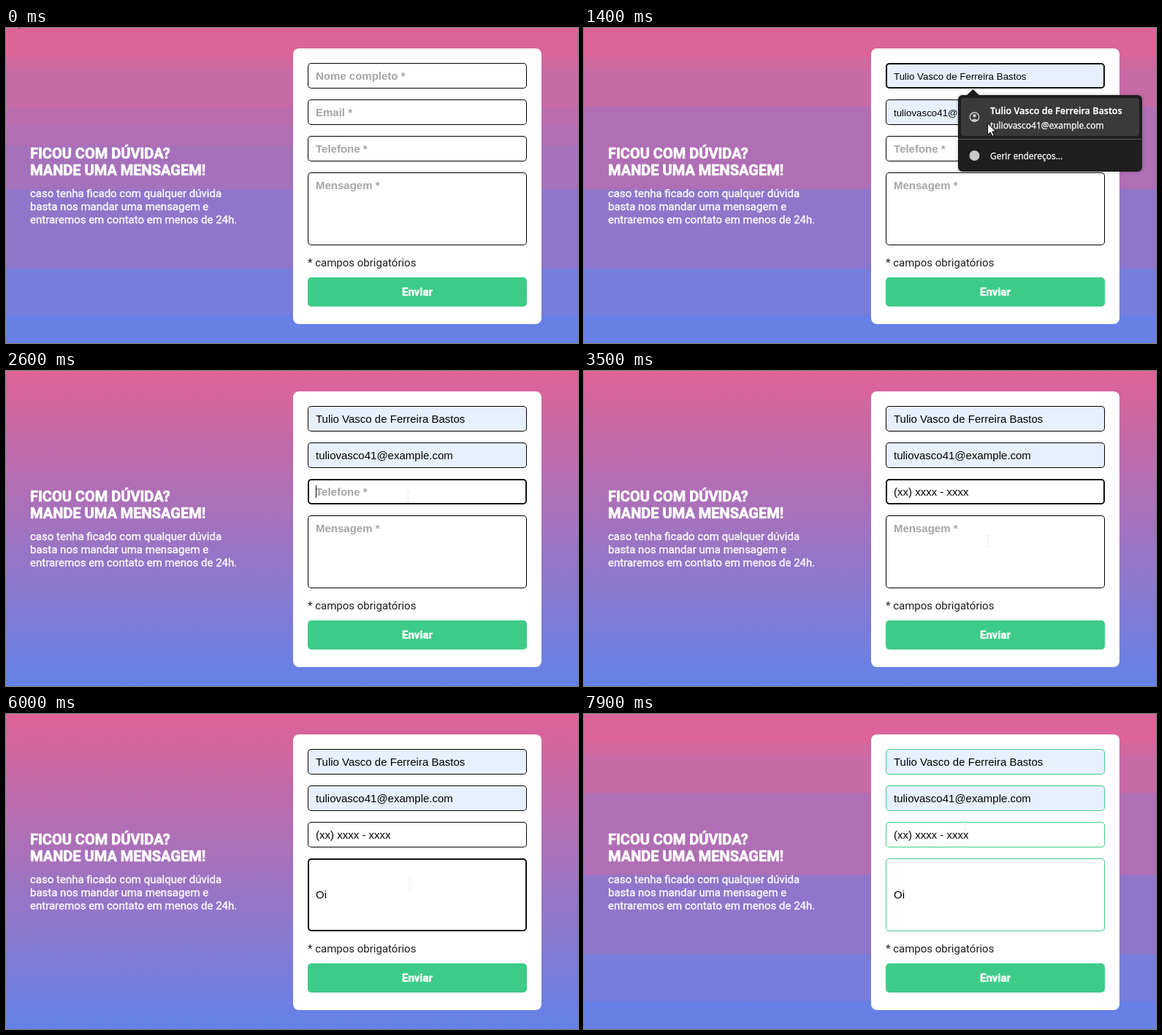
Animation, 783 px wide and 432 px high, one loop 8 s. Source, as an HTML page with a canvas:

```html
<!DOCTYPE html>
<html lang="pt">
<head>
<meta charset="utf-8">
<style>
  html, body { margin: 0; width: 783px; height: 432px; overflow: hidden; }
  canvas { display: block; }
</style>
</head>
<body>
<canvas id="stage" width="783" height="432"></canvas>
<script>
const ctx = document.getElementById('stage').getContext('2d');
const LOOP = 8000, STEP = 100;
const NAME = 'Tulio Vasco de Ferreira Bastos';
const EMAIL = 'tuliovasco41@example.com';
const PHONE = '(xx) xxxx - xxxx';
const GREEN = '#3dcc87';
const ARIAL = 'px "Liberation Sans", Arial, sans-serif';
const ROBOTO = 'px Roboto, sans-serif';
const MENU = 'px "Open Sans", sans-serif';

// Background bands: [top, colour]
const ends = [[222, '#8f76ca'], [331, '#767ddb'], [395, '#6780e5']];
const start = [[0, '#dc6499'], [41, '#d1689f'], [57, '#c86aa6']];
const introBands = [...start, [109, '#bb6cad'], [135, '#b16eb3'], [162, '#a671bb'], ...ends];
const bands = [...start, [109, '#b06eb4'], ...ends];

// Pointer track: [time, x, y]
const track = [
  [0, 11, -18], [500, 493, 308], [600, 493, 308], [900, 534, 68], [1200, 534, 68],
  [1400, 552, 130], [1700, 552, 130], [2000, 550, 176], [2200, 550, 176], [2300, 550, 172],
  [3000, 550, 172], [3100, 544, 192], [3300, 552, 233], [6500, 552, 233], [7000, 592, 366],
  [7300, 592, 366], [7600, 585, 362], [7700, 585, 362], [7900, 521, 150]
];

const arrow = new Path2D('M.5 .5V16.5L4.3 13L6.8 18.5L9.3 17.4L6.9 12H11.5Z');
const hand = new Path2D('M-1.5 2Q0 -.8 1.5 2V9Q3.2 7.3 4.5 9.5Q6.2 8 7.4 10Q9.6 9 10.5 11.5V16Q10.3 20 8 23.3H1Q-1 18.5 -4.8 14.8Q-5.6 11.6 -1.5 14Z');
const person = new Path2D('M-4 4.6Q0 .2 4 4.6Q0 7.4 -4 4.6Z');

const between = (t, a, b) => t >= a && t < b;

function box(x, y, w, h, r, fill) {
  ctx.fillStyle = fill;
  ctx.beginPath();
  ctx.roundRect(x, y, w, h, r);
  ctx.fill();
}

function disc(x, y, r, fill) {
  box(x - r, y - r, 2 * r, 2 * r, r, fill);
}

function text(str, x, y, font, fill) {
  ctx.font = font;
  ctx.fillStyle = fill;
  ctx.fillText(str, x, y);
  return ctx.measureText(str).width;
}

// Light text on a dark ground, thickened by a hairline
function lightText(str, x, y, font, weight = 0.3) {
  text(str, x, y, font, '#fff');
  ctx.strokeStyle = '#fff';
  ctx.lineWidth = weight;
  ctx.lineJoin = 'round';
  ctx.strokeText(str, x, y);
}

function background(t) {
  const grad = ctx.createLinearGradient(0, 0, 0, 432);
  if (between(t, 2500, 6600)) {
    grad.addColorStop(0, '#df6396');
    grad.addColorStop(1, '#6382e8');
  } else {
    const list = t < 700 ? introBands : bands;
    list.forEach(([top, colour], i) => {
      const bottom = i + 1 < list.length ? list[i + 1][0] : 432;
      grad.addColorStop(top / 432, colour);
      grad.addColorStop((bottom - 2) / 432, colour);
    });
  }
  ctx.fillStyle = grad;
  ctx.fillRect(0, 0, 783, 432);
}

function field(y, h, { hint, value = '', size = 15, focus, caret, filled, line = y + 23 }, valid) {
  const edge = focus ? 2 : 1;
  box(413, y, 300, h, 5, focus ? '#101010' : valid ? GREEN : '#000');
  box(413 + edge, y + edge, 300 - 2 * edge, h - 2 * edge, 5 - edge, filled ? '#e8f0fe' : '#fff');
  let width = 0;
  if (value) width = text(value, 424, line, size + ARIAL, '#000');
  else text(hint, 424, y + 23, 'bold 15' + ARIAL, '#a5a5a5');
  if (caret) {
    ctx.fillStyle = '#000';
    ctx.fillRect(Math.floor(424 + width), line - 14, 1, 17);
  }
}

function menu(hover) {
  ctx.save();
  ctx.shadowColor = '#0004';
  ctx.shadowBlur = 4;
  box(512, 92, 252, 105, 6, '#1e1e1e');
  ctx.restore();
  ctx.fillStyle = '#1e1e1e';
  ctx.fill(new Path2D('M523 93L532.5 84L542 93Z'));
  if (hover) box(516, 96, 244, 52, 4, '#3a3a3a');
  ctx.fillStyle = '#555';
  ctx.fillRect(512, 152, 252, 1);

  ctx.save();
  ctx.translate(534.5, 122);
  ctx.strokeStyle = '#c8c8c8';
  ctx.lineWidth = 1.5;
  ctx.beginPath();
  ctx.arc(0, 0, 6.2, 0, 7);
  ctx.stroke();
  disc(0, -1.8, 2.3, '#c8c8c8');
  ctx.fill(person);
  ctx.restore();
  disc(534.5, 175, 7, '#c8c8c8');

  lightText(NAME, 556, 118, '600 12.6' + MENU);
  lightText(EMAIL, 556, 138, '12' + MENU);
  lightText('Gerir endereços...', 556, 180, '12' + MENU);
}

function pointerAt(t) {
  let i = track.findIndex(key => key[0] > t);
  if (i < 0) i = track.length - 1;
  const [t0, x0, y0] = track[i - 1], [t1, x1, y1] = track[i];
  const k = Math.min(1, (t - t0) / (t1 - t0));
  const ease = k * k * (3 - 2 * k);
  return [Math.round(x0 + (x1 - x0) * ease), Math.round(y0 + (y1 - y0) * ease)];
}

function pointer(t) {
  const [x, y] = pointerAt(t);
  const inColumn = between(x, 413, 713);
  const fromMenu = between(t, 1300, 1800);
  const overField = inColumn && !fromMenu &&
    [[48, 83], [98, 133], [148, 183], [198, 298]].some(([a, b]) => between(y, a, b));

  ctx.save();
  ctx.translate(x, y);
  if (overField) {
    ctx.fillStyle = '#f0f0f0';
    ctx.fillRect(-3, -8, 7, 1);
    ctx.fillRect(0, -8, 1, 17);
    ctx.fillRect(-3, 8, 7, 1);
  } else {
    const shape = inColumn && between(y, 342, 382) ? hand : arrow;
    ctx.fillStyle = '#fff';
    ctx.strokeStyle = '#000';
    ctx.lineWidth = 1;
    ctx.fill(shape);
    ctx.stroke(shape);
    if (shape === hand) {
      ctx.fillStyle = '#000';
      for (const fx of [1, 4, 7]) ctx.fillRect(fx, 9, 1, 4);
    }
  }
  ctx.restore();
}

function draw(t) {
  const filled = t >= 1300;
  const valid = t >= 7200;
  const size = t < 1600 ? 40 / 3 : 15;

  background(t);
  lightText('FICOU COM DÚVIDA?', 33, 179, 'bold 20' + ROBOTO, 0.7);
  lightText('MANDE UMA MENSAGEM!', 33, 202, 'bold 20' + ROBOTO, 0.7);
  ['caso tenha ficado com qualquer dúvida',
   'basta nos mandar uma mensagem e',
   'entraremos em contato em menos de 24h.'
  ].forEach((line, i) => lightText(line, 33, 232 + 18 * i, '15' + ROBOTO));

  box(393, 28, 340, 378, 8, '#fff');
  field(48, 35, {
    hint: 'Nome completo *', value: filled ? NAME : '', size, filled,
    focus: between(t, 1000, 2500),
    caret: between(t, 1000, 1300) || between(t, 1600, 2100)
  }, valid);
  field(98, 35, { hint: 'Email *', value: filled ? EMAIL : '', size, filled }, valid);
  field(148, 35, {
    hint: 'Telefone *', value: t < 3000 ? '' : PHONE,
    focus: between(t, 2500, 3800),
    caret: between(t, 2500, 3500)
  }, valid);
  field(198, 100, {
    hint: 'Mensagem *', line: 253,
    value: t < 4900 ? '' : t < 5500 ? 'O' : 'Oi',
    focus: between(t, 3800, 7100),
    caret: [[3800, 4300], [4800, 5300], [5500, 6000], [6600, 7100]].some(([a, b]) => between(t, a, b))
  }, valid);
  text('* campos obrigatórios', 413, 327, '15' + ROBOTO, '#1c1c1c');
  box(413, 342, 300, 40, 5, GREEN);
  lightText('Enviar', 542, 367, 'bold 15' + ROBOTO, 0.5);

  if (between(t, 1100, 1600)) menu(filled);
  pointer(t);
}

const origin = performance.now();
function tick() {
  const t = (performance.now() - origin) % LOOP;
  draw(Math.floor(t / STEP) * STEP);
  requestAnimationFrame(tick);
}
tick();
</script>
</body>
</html>
```
